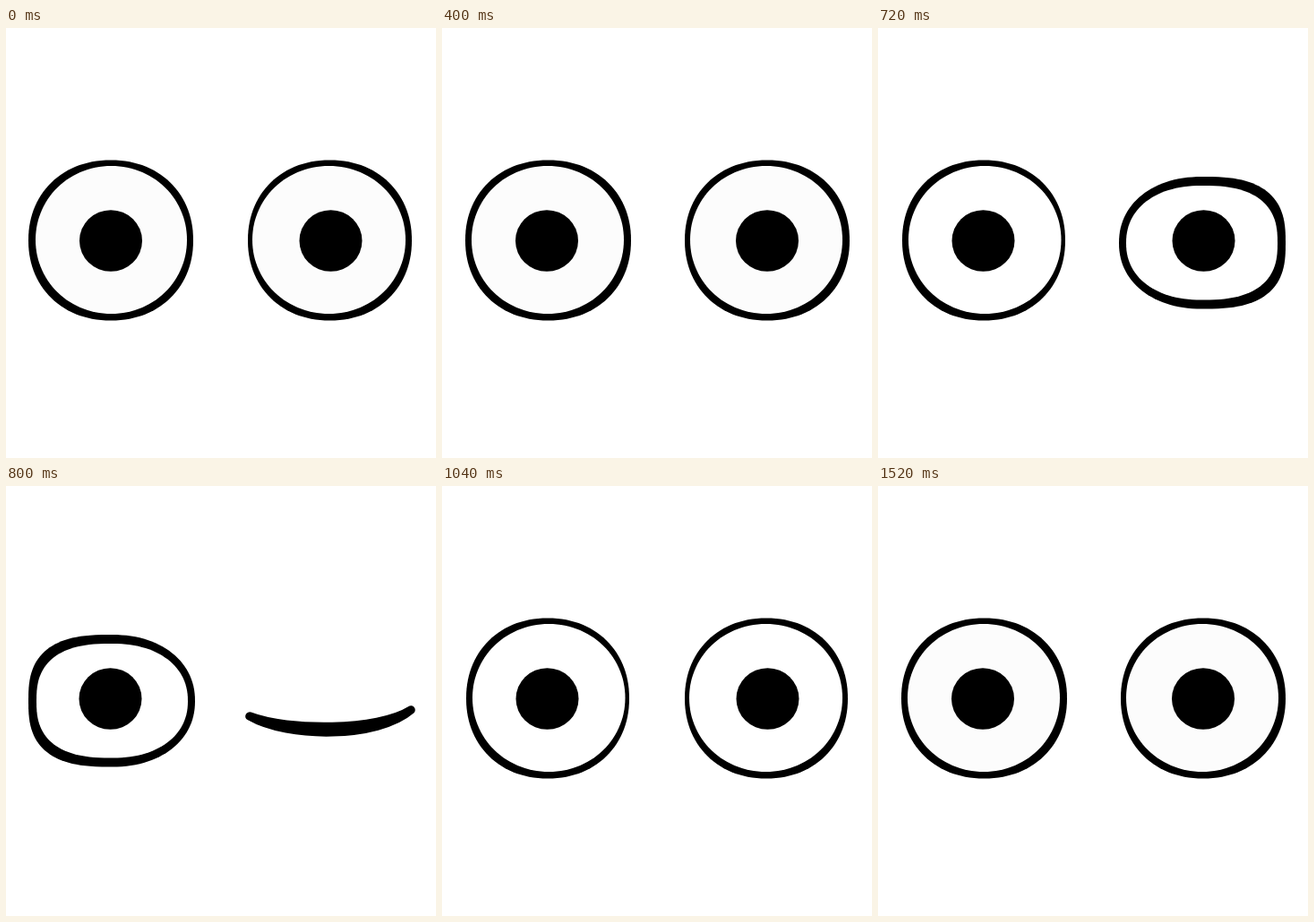
Recreate the animation shown at these times as an HTML page with a canvas. Size 480x480 px, loop 1.6 s.

```html
<!DOCTYPE html>
<html lang="en">
<head>
<meta charset="utf-8">
<title>Blinking eyes</title>
<style>
  html, body { margin: 0; width: 100%; height: 100%; overflow: hidden; background: #fff; }
  canvas { display: block; width: 480px; height: 480px; }
</style>
</head>
<body>
<canvas id="stage" width="480" height="480"></canvas>
<script>
const ctx = document.getElementById('stage').getContext('2d');
const SIZE = 480;
const LOOP = 1600;
const IDLE_STEP = 80;
const BLINK_STEP = 40;
const PAPER = '#fcfcfc';

// An outline is a superellipse with its own upper and lower height, tilted
// along its midline. The corner exponents make each side rounder or squarer.
const shape = (left, right, top, mid, bottom, cornerL, cornerR, tilt = 0) =>
  ({ left, right, top, mid, bottom, cornerL, cornerR, tilt });

const roundEye = (outerL, outerR, innerL, innerR, pupilX, fill = '#fff') => ({
  outer: shape(outerL, outerR, 147.5, 237, 326.5, 2.12, 2.12),
  inner: shape(innerL, innerR, 154, 236.5, 319, 2.02, 2.02),
  pupilX, fill
});

const idle = [
  { left: roundEye(25, 209, 33, 202, 117, PAPER), right: roundEye(270, 453, 275, 446, 362.5, PAPER) },
  { left: roundEye(26, 211, 33, 203, 117, PAPER), right: roundEye(271, 455, 277, 447, 363, PAPER) }
];
const rest = { left: roundEye(27, 209, 34, 204.5, 117.5), right: roundEye(271, 453, 276, 447, 363.5) };

const wide = {
  outer: shape(269, 455, 166, 240, 313.5, 2.15, 2.75),
  inner: shape(277, 446, 176, 240, 303.5, 2.2, 2.6),
  pupilX: 363.5, fill: '#fff'
};
const half = {
  outer: shape(268, 454, 202, 243, 308, 2, 2.75, -5),
  inner: shape(275, 446, 213, 246, 299, 2, 2.5, -4),
  pupilX: 363.5, fill: '#fff'
};

const squeeze = (s, k) => {
  const y = v => 270 + (v - 270) * k;
  return { ...s, top: y(s.top), mid: y(s.mid), bottom: y(s.bottom) };
};
const slit = { ...half, outer: squeeze(half.outer, 0.68), inner: squeeze(half.inner, 0.6) };

const mirrored = eye => ({ ...eye, flip: !eye.flip });
const closed = { closed: true };
const rightBlink = [wide, half, mirrored(closed), slit, half, wide];
const leftBlink = rightBlink.map(mirrored);

function trace(s) {
  const cx = (s.left + s.right) / 2;
  const rx = (s.right - s.left) / 2;
  const steps = 120;
  const path = new Path2D();
  for (let i = 0; i < steps; i++) {
    const angle = i / steps * Math.PI * 2;
    const c = Math.cos(angle);
    const d = Math.sin(angle);
    const power = 2 / (c < 0 ? s.cornerL : s.cornerR);
    const x = Math.sign(c) * Math.abs(c) ** power;
    const y = Math.sign(d) * Math.abs(d) ** power;
    const height = y < 0 ? s.mid - s.top : s.bottom - s.mid;
    path.lineTo(cx + rx * x, s.mid + s.tilt * x + height * y);
  }
  path.closePath();
  return path;
}

// The shut lid: two arcs with shared ends, thicker in the middle.
function drawLid() {
  ctx.lineWidth = 9.5;
  ctx.lineCap = ctx.lineJoin = 'round';
  ctx.beginPath();
  ctx.moveTo(28, 250);
  ctx.bezierCurveTo(65, 273.5, 165, 273.5, 208, 257);
  ctx.bezierCurveTo(165, 282, 65, 282, 28, 250);
  ctx.fill();
  ctx.stroke();
}

function drawOpen({ outer, inner, pupilX, fill }) {
  const rim = trace(outer);
  ctx.fill(rim);
  ctx.fillStyle = fill;
  ctx.fill(trace(inner));
  ctx.clip(rim);
  ctx.fillStyle = '#000';
  ctx.beginPath();
  ctx.ellipse(pupilX, 237.5, 35, 34.3, 0, 0, Math.PI * 2);
  ctx.fill();
}

function drawEye(eye) {
  ctx.save();
  if (eye.flip) ctx.transform(-1, 0, 0, 1, SIZE, 0);
  ctx.fillStyle = ctx.strokeStyle = '#000';
  if (eye.closed) drawLid();
  else drawOpen(eye);
  ctx.restore();
}

const blinkPose = (poses, open, time) => poses[Math.floor(time / BLINK_STEP)] || open;

function eyesAt(t) {
  if (t < 640 || t >= 1120) return idle[Math.floor(t / IDLE_STEP) % 2];
  // The right eye blinks first, the left one follows 80 ms later.
  return {
    left: blinkPose(leftBlink, rest.left, t - 800),
    right: blinkPose(rightBlink, rest.right, t - 720)
  };
}

function draw(t) {
  ctx.fillStyle = '#fff';
  ctx.fillRect(0, 0, SIZE, SIZE);
  const { left, right } = eyesAt(t);
  drawEye(left);
  drawEye(right);
}

let start;
function tick(now) {
  start ??= now;
  draw(Math.max(0, now - start) % LOOP);
  requestAnimationFrame(tick);
}
draw(0);
requestAnimationFrame(tick);
</script>
</body>
</html>
```
